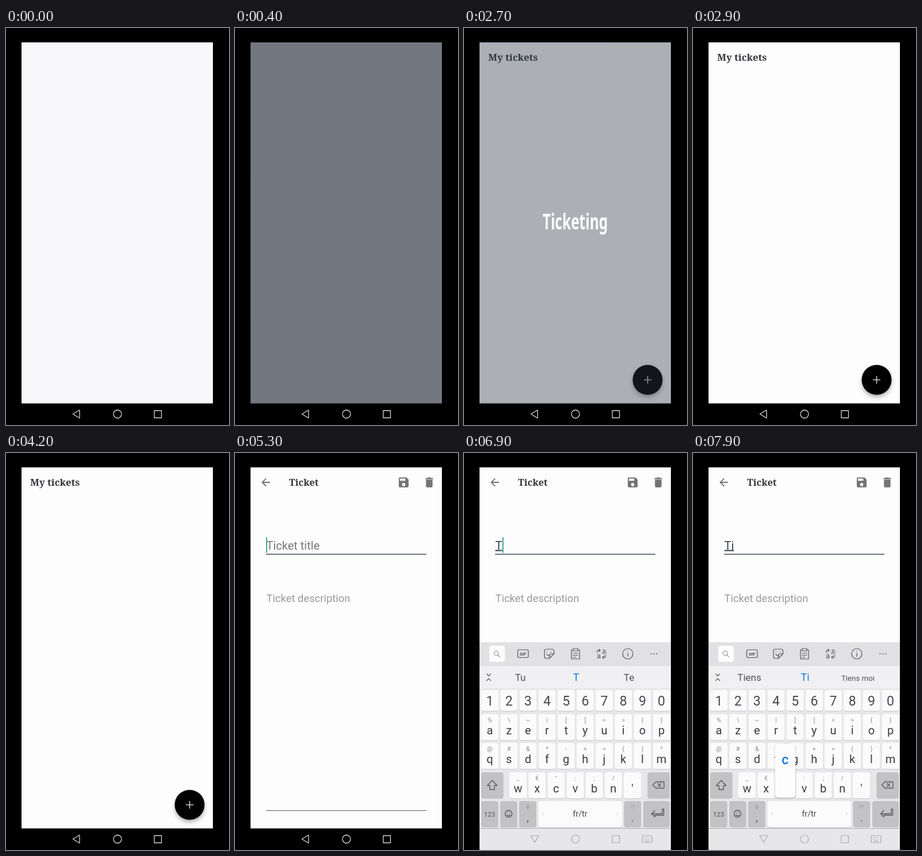
Recreate the animation shown at these times as an HTML page. Size 388x690 px, loop 8000 ms.

```html
<!DOCTYPE html>
<html lang="en">
<head>
<meta charset="utf-8">
<title>Ticketing</title>
<style>
html, body { margin: 0; width: 100%; height: 100%; overflow: hidden; background: #000; }
svg { display: block; width: 388px; height: 690px; }
text { font-family: Roboto, sans-serif; }
.serif { font-family: "Noto Serif", serif; font-weight: 700; fill: #36373b; }
.logo { font: 700 24.5px "Noto Sans", sans-serif; fill: #fff; }
.mid text, text.mid { text-anchor: middle; }
.line { fill: none; stroke-linecap: round; stroke-linejoin: round; }
.blue { fill: #1276e0; }
</style>
</head>
<body>
<svg viewBox="0 0 388 690">
  <defs>
    <filter id="shade" x="-30%" y="-30%" width="160%" height="170%">
      <feDropShadow dx="0" dy="4" stdDeviation="3.5" flood-opacity=".3"/>
    </filter>
    <filter id="lift" x="-30%" y="-20%" width="160%" height="140%">
      <feDropShadow dx="0" dy="1" stdDeviation="1.5" flood-opacity=".3"/>
    </filter>
    <g id="nav" class="line">
      <circle cx="194" cy="671" r="7"/>
      <rect x="258" y="665" width="12.5" height="12.5"/>
    </g>
  </defs>

  <rect x="27" y="25" width="333" height="628" fill="#f9f8fb"/>
  <g id="splash">
    <rect x="27" y="25" width="333" height="628" fill="#303a45"/>
    <text id="logo" class="logo mid" transform="translate(193.5 350) scale(1 1.55)">Ticketing</text>
  </g>

  <g id="home">
    <rect x="27" y="25" width="333" height="628" fill="#fdfdfe"/>
    <text class="serif" x="42" y="57" font-size="16.8">My tickets</text>
    <circle cx="319.5" cy="611.5" r="26" filter="url(#shade)"/>
    <path d="M313 611.5h13M319.5 605v13" stroke="#ccc" stroke-width="1.6"/>
  </g>

  <g id="page">
    <rect x="27" y="25" width="333" height="628" fill="#fdfdfe"/>
    <text class="serif" x="94" y="57" font-size="16.5">Ticket</text>
    <g fill="#737376">
      <path transform="translate(42.5 40) scale(.92)" d="M20 11H7.83l5.59-5.59L12 4l-8 8 8 8 1.41-1.41L7.83 13H20v-2z"/>
      <path transform="translate(282.1 39.7) scale(.95)" d="M17 3H5c-1.11 0-2 .9-2 2v14c0 1.1.89 2 2 2h14c1.1 0 2-.9 2-2V7l-4-4zm-5 16c-1.66 0-3-1.34-3-3s1.34-3 3-3 3 1.34 3 3-1.34 3-3 3zm3-10H5V5h10v4z"/>
      <path transform="translate(326.6 39.7) scale(.95)" d="M6 19c0 1.1.9 2 2 2h8c1.1 0 2-.9 2-2V7H6v12zM19 4h-3.5l-1-1h-5l-1 1H5v2h14V4z"/>
    </g>
    <text id="hint" x="54.5" y="167.5" font-size="20">Ticket title</text>
    <text id="typed" x="54.5" y="167.5" font-size="20" fill="#333c46" text-decoration="underline"></text>
    <path d="M54 176h279" stroke="#41475a" stroke-width="1.6"/>
    <rect id="caret" y="146.5" width="1.5" height="27" fill="#0a8f6e"/>
    <text x="54.5" y="258.5" font-size="18.4" fill="#9b9b9d">Ticket description</text>
    <path d="M54 621.5h279" stroke="#55585f" stroke-width="1.2"/>
  </g>

  <g id="board">
    <rect x="27" y="329" width="333" height="324" fill="#e7e7e9"/>
    <rect x="27" y="329" width="333" height="41" fill="#e1e1e4"/>
    <rect x="27" y="370" width="333" height="39" fill="#f0f0f2"/>
    <rect x="44" y="335" width="27" height="28" rx="4" fill="#fdfdfe"/>
    <g class="line" stroke="#8a8a8e" stroke-width="1.1"><circle cx="56" cy="348" r="3.8"/><path d="M59 351l3.4 3.4"/></g>
    <g class="line" stroke="#55555a" stroke-width="1.2">
      <rect x="93.500" y="342" width="18.500" height="13.500" rx="2.500"/>
      <path d="M156.500 349v-5a3 3 0 0 0-3-3h-10.500a3 3 0 0 0-3 3v10a3 3 0 0 0 3 3h5.500l8-8h-5a3 3 0 0 0-3 3v5M144 350q3 3.500 5.500 1M144.500 345.500v.5M151.500 345.500v.5"/>
      <path d="M190 342h-3v16h14v-16h-3M190 340h8v4h-8zM190 348h8M190 351.500h8M190 355h5"/>
      <path d="M232 347v-4h5l-2-2m2 2l-2 2M246 351v4h-5l2-2m-2 2l2 2"/>
      <circle cx="285" cy="349" r="9"/><path d="M285 348v5.500M285 344.500v.3"/>
      <path d="M39.500 384l3.500 3.500 3.500-3.500M39.500 395.500l3.500-3.500 3.500 3.500"/>
    </g>
    <g class="mid" fill="#55555a">
      <text x="102.700" y="351.500" font-size="7.500" font-weight="700">GIF</text>
      <text x="234.500" y="357" font-size="13">a</text>
      <text x="244" y="349" font-size="9.500" style="font-family:'Noto Sans CJK JP','Noto Sans CJK',sans-serif">あ</text>
      <circle cx="325.500" cy="349" r="1"/><circle cx="330.500" cy="349" r="1"/><circle cx="335.500" cy="349" r="1"/>
    </g>
    <g class="mid" fill="#515156">
      <text id="left" x="98" y="396" font-size="17"></text>
      <text id="best" class="blue" x="195" y="396" font-size="18"></text>
      <text id="right" x="287" y="395.500"></text>
    </g>
    <g id="keys" class="mid"></g>
    <g class="line" stroke="#55555a" stroke-width="1.3">
      <path id="shift" d="M49 569l8.500 9h-4.500v7h-8v-7h-4.500z"/>
      <path d="M334 571.500h14v11h-14l-5.500-5.500zM337.500 574.500l5 5m0-5l-5 5"/>
      <circle cx="77.500" cy="627" r="6"/><path d="M74.500 629q3 3 6 0M75.500 625v.3M79.500 625v.3"/>
      <path d="M345 619v8h-18M332 621.500l-5.500 5.500 5.500 5.500v-3h15.500v-10.500h-2.500"/>
    </g>
    <g class="line" stroke="#98989c" stroke-width="1">
      <rect x="109.500" y="611" width="3" height="5" rx="1.500"/><path d="M108 615q3 4.500 6 0M111 617.500v2"/>
      <path d="M138.500 625l-2.500 2.500 2.500 2.500M266 625l2.500 2.500-2.500 2.500" stroke="#ccc"/>
    </g>
    <g id="popup" class="mid">
      <rect x="-17.500" y="-50" width="35" height="93.500" rx="5" fill="#fdfdfe" filter="url(#lift)"/>
      <text id="pressed" class="blue" y="-14.500" font-size="23" font-weight="500"></text>
    </g>
  </g>

  <path d="M0 652.500h388V690H0z"/>
  <g id="darkNav" stroke="#d8d8d8" stroke-width="1.300">
    <use href="#nav"/><path class="line" d="M116.500 671l11.500-7v14z"/>
  </g>
  <g id="lightNav" stroke="#a9a9ac" stroke-width="1.200">
    <path d="M27 652.500h333V690H27z" fill="#e7e7e9" stroke="none"/>
    <use href="#nav"/><path class="line" d="M116 665h14l-7 12z"/>
    <rect class="line" x="310" y="665" width="17" height="12" rx="1"/>
    <path class="line" d="M313 668.500h11M313 671.500h11" stroke-dasharray=".5 2.500"/><path d="M314.500 674.500h8"/>
  </g>
</svg>
<script>
const LOOP = 8000, PITCH = 33.17;
const $ = id => document.getElementById(id);
const esc = s => s.replace(/&/g, '&amp;').replace(/</g, '&lt;');
const ramp = (t, a, b) => Math.min(1, Math.max(0, (t - a) / (b - a)));
const show = (id, on) => $(id).style.opacity = +on;

const tile = (x, y, w, h, fill = '#fbfbfc') =>
  `<rect x="${x}" y="${y + 1.2}" width="${w}" height="${h}" rx="4" fill="#cfcfd2"/>` +
  `<rect x="${x}" y="${y}" width="${w}" height="${h}" rx="4" fill="${fill}"/>`;
const label = (s, x, y, size, fill, cls = '') =>
  `<text class="${cls}" x="${x}" y="${y}" font-size="${size}" fill="${fill}">${esc(s)}</text>`;

const spots = {};
function row(chars, hints, x0, y) {
  return [...chars].map((c, i) => {
    const x = x0 + i * PITCH;
    spots[c] = [x, y];
    return tile(x - 15, y, 30, 45) + label(c, x, y + 35, 20, '#3c3c40', 'letter') +
      label(hints[i], x, y + 13.5, 11, '#8b8b8f');
  }).join('');
}

const GREY = '#c2c2c5';
$('keys').innerHTML =
  [...'1234567890'].map((c, i) => tile(30 + i * PITCH, 412, 30, 36) +
    label(c, 45 + i * PITCH, 439, 23, '#48484c')).join('') +
  row('azertyuiop', '%\\~|[]<>{}', 45, 454) +
  row('qsdfghjklm', '@#&*-+=()^', 45, 504) +
  row("wxcvbn'", '_€":;/ ', 94, 555) +
  tile(30, 555, 38.5, 45, GREY) + tile(319.5, 555, 38.5, 45, GREY) +
  [[30, 29.5], [63, 29.5], [96, 30], [278.5, 29.5], [312, 46]].map(([x, w]) => tile(x, 605, w, 45, GREY)).join('') +
  tile(129.5, 605, 145.5, 45) +
  label('123', 44.5, 631.5, 11.5, '#55555a') + label(',', 111, 640, 18, '#55555a') +
  label('fr/tr', 202, 632, 14.5, '#48484c') + label('.', 293, 640, 18, '#55555a') +
  label('!?', 293, 619, 9.5, '#98989c');
const letters = [...document.querySelectorAll('.letter')];

// start time, typed text, caret x, suggestions, size of the right one
const entries = [
  [4900, '', 54.3, 'Merci', 'Je', 'I', 17],
  [6700, 'T', 67, 'Tu', 'T', 'Te', 17],
  [7300, 'Ti', 72, 'Tiens', 'Ti', 'Tiens moi', 13.3]
];
// press, release, key, label
const presses = [[6600, 6750, 't', 'T'], [7200, 7350, 'i', 'i'], [7850, 8000, 'c', 'c']];

function draw(t) {
  show('splash', ramp(t, 200, 500));
  show('logo', ramp(t, 700, 1500));
  show('home', ramp(t, 2550, 2800));
  show('page', ramp(t, 4850, 5050));

  const rise = 1 - (1 - ramp(t, 5400, 5750)) ** 2;
  $('board').setAttribute('transform', `translate(0 ${324 * (1 - rise)})`);
  show('board', rise > 0);
  show('lightNav', rise > 0);

  const [start, text, caretX, left, best, right, size] = entries.filter(e => t >= e[0]).pop() || entries[0];
  $('typed').textContent = text;
  $('left').textContent = left;
  $('best').textContent = best;
  $('right').textContent = right;
  $('right').setAttribute('font-size', size);
  $('hint').setAttribute('fill', t < 5500 ? '#777779' : '#959597');
  show('hint', !text);
  $('caret').setAttribute('x', caretX);
  show('caret', t >= start && (t - start) % 1000 < 500);

  for (const el of letters)
    el.textContent = text ? el.textContent.toLowerCase() : el.textContent.toUpperCase();
  $('shift').setAttribute('fill', text ? 'none' : '#55555a');

  const press = presses.find(p => t >= p[0] && t < p[1]);
  show('popup', !!press);
  if (press) {
    $('popup').setAttribute('transform', `translate(${spots[press[2]]})`);
    $('pressed').textContent = press[3];
  }
}

const begin = performance.now();
function tick() {
  draw((performance.now() - begin) % LOOP);
  requestAnimationFrame(tick);
}
tick();
</script>
</body>
</html>
```
